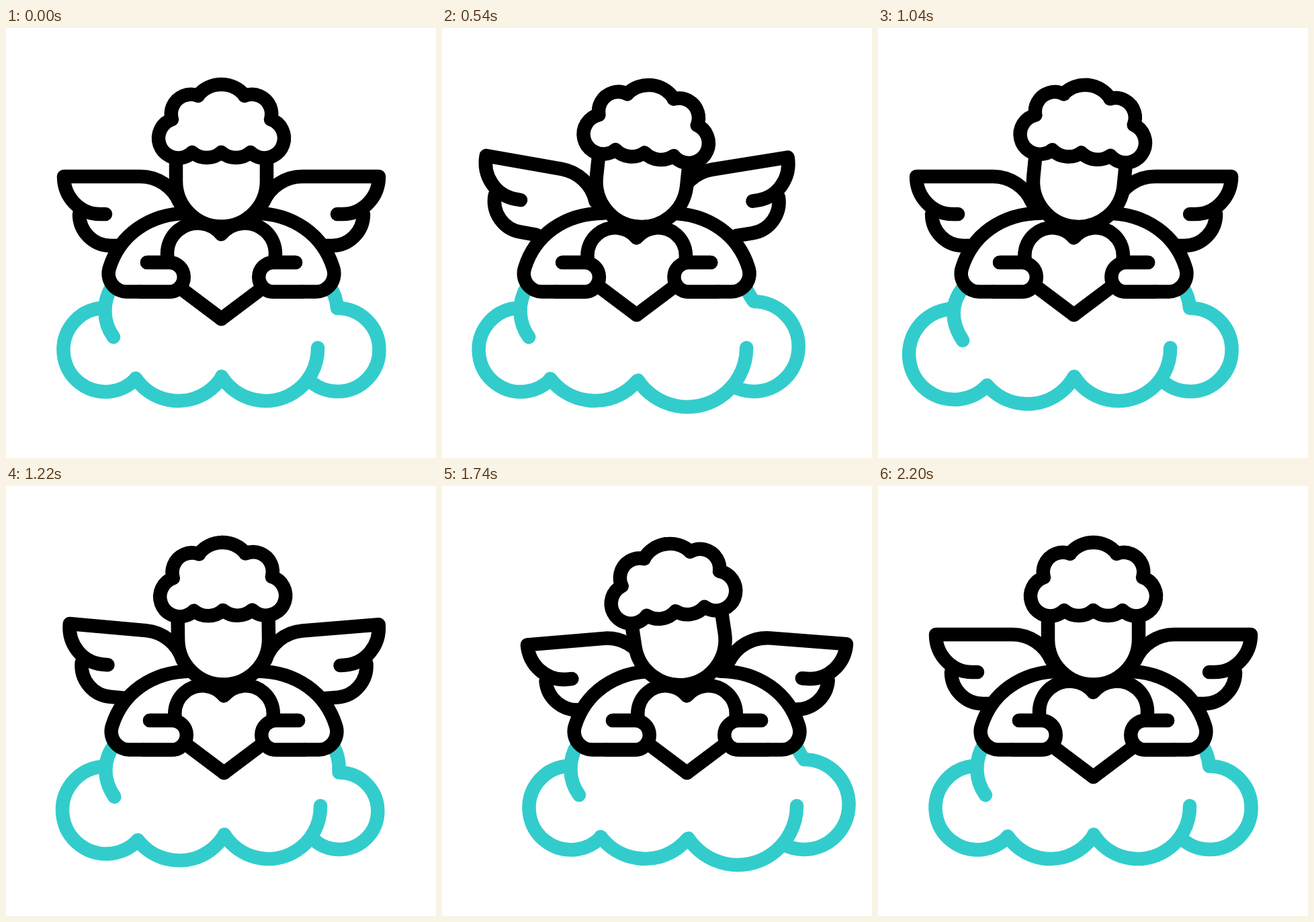
Recreate the animation shown at these times as an HTML page with a canvas. Size 640 by 640 pixels, loop 2400 ms.

```html
<!DOCTYPE html>
<html lang="en">
<head>
<meta charset="utf-8">
<title>Cupid on a cloud</title>
<style>
html, body { margin: 0; width: 100%; height: 100%; overflow: hidden; background: #fff; }
canvas { display: block; width: 100vw; height: 100vh; }
</style>
</head>
<body>
<canvas></canvas>
<script>
const LOOP = 2400, LEAD = 200, SIZE = 640, MID = 320.5;
const SWAY_KEYS = [0, 600, 1400, 2000];
const POSE_KEYS = [0, 333, 833, 1220, 1540, 2000];
const { PI } = Math;

const canvas = document.querySelector('canvas');
const ctx = canvas.getContext('2d');
canvas.width = canvas.height = SIZE * devicePixelRatio;

const arm = new Path2D('M210 349H243A21.75 21.75 0 0 1 243 392.5H180A27 27 0 0 1 154 357C169 309 212 276 272 275.5');
const hand = new Path2D('M210 349H243A21.75 21.75 0 0 1 243 392.5H200');

// Weight of key i: eases up from the key before and down to the key after.
function weight(keys, i, t) {
  const span = t < keys[i] ? keys[i] - keys[i - 1] : keys[i + 1] - keys[i];
  const u = Math.max(0, 1 - Math.abs(t - keys[i]) / span);
  return u * u * (3 - 2 * u);
}

let pen;
function start(x, y) {
  ctx.beginPath();
  ctx.moveTo(x, y);
  pen = [x, y];
}

// Arc around (x, y) from the pen to the direction of (toX, toY).
function puff(x, y, r, toX, toY, ccw = true) {
  ctx.arc(x, y, r, Math.atan2(pen[1] - y, pen[0] - x), Math.atan2(toY - y, toX - x), ccw);
  pen = [toX, toY];
}

function shape(path) {
  ctx.fill(path);
  ctx.stroke(path);
}

function both(draw) {
  for (const side of [1, -1]) {
    ctx.save();
    ctx.translate(MID, 0);
    ctx.scale(side, 1);
    ctx.translate(-MID, 0);
    draw(side);
    ctx.restore();
  }
}

function turn(x, y, degrees) {
  ctx.translate(x, y);
  ctx.rotate(degrees * PI / 180);
  ctx.translate(-x, -y);
}

function cloud(swell, droop, pinch) {
  ctx.strokeStyle = '#3cc';

  start(140 - 6 * droop, 417 + droop);
  puff(148 - 5.5 * droop, 479 + 6.5 * droop, 62.5 + 5 * droop, 192 - droop, 522 + 10 * droop);
  puff(256.5 + 1.5 * swell - 5 * droop, 478 - 6 * swell + 2 * droop, 77 + 5.8 * swell + 2.5 * droop,
    MID + 1.5 * swell, 519 + 6 * swell);
  puff(386.5 + 9.5 * swell, 477.5 - 1.5 * swell, 77.5 + 10.5 * swell, 464 + 19.5 * swell, 476);
  ctx.stroke();

  start(158, 384);
  ctx.bezierCurveTo(143 - 7 * droop, 408, 144 - 7 * droop, 438, 160 - 5 * droop, 460 + 5 * droop);
  ctx.stroke();

  const top = [493 + 2 * swell - 3 * pinch, 417 - 10 * swell + 20 * pinch];
  start(482, 385);
  ctx.bezierCurveTo(489 - 3 * swell + pinch, 395 - 2 * swell + 5 * pinch,
    492 - 2 * swell + pinch, 405 - 4 * swell + 13 * pinch, ...top);
  pen = top;
  puff(493.5 + swell - 3 * pinch, 479 - 5 * swell + 10 * pinch, 62 + 5 * swell - 10 * pinch,
    455 + 9 * swell, 528 + 6 * swell, false);
  ctx.stroke();
}

function wing(angle) {
  turn(268, 266, angle);
  start(109, 277);
  ctx.arc(156, 277, 47, PI, PI / 2, true);
  ctx.lineTo(180, 324);
  ctx.stroke();

  start(148, 277);
  ctx.ellipse(140, 221, 54, 56, 0, PI / 2, PI);
  ctx.lineTo(200, 221);
  ctx.arc(200, 284, 63, -PI / 2, -PI / 8);
  ctx.stroke();
}

function halfHeart(scale) {
  ctx.save();
  ctx.translate(MID, 366);
  ctx.scale(scale, scale);
  ctx.translate(-MID, -366);
  start(MID, 307);
  puff(285.5, 336, 45.5, 240, 336);
  ctx.bezierCurveTo(240, 360, 250, 380, 262, 389);
  ctx.lineTo(MID, 433);
  ctx.restore();
  shapeCurrent();
}

function shapeCurrent() {
  ctx.fill();
  ctx.stroke();
}

function halfFace() {
  start(253, 190);
  ctx.arc(MID, 228, 67.5, PI, PI / 2, true);
  ctx.lineTo(MID, 190);
  ctx.fill();
  start(253, 190);
  ctx.arc(MID, 228, 67.5, PI, PI / 2, true);
  ctx.stroke();
}

function halfHair() {
  start(MID, 84);
  puff(MID, 129, 45, 286, 101);
  puff(275, 128, 29.2, 247, 136);
  puff(256.5, 164, 29.5, 277, 185);
  puff(298.75, 159.4, 33.6, MID, 185);
  shapeCurrent();
}

function draw(t) {
  const pose = i => weight(POSE_KEYS, i, t);
  const sway = weight(SWAY_KEYS, 2, t) - weight(SWAY_KEYS, 1, t);
  const flap = 10 * pose(1) + 10.7 * pose(3) - 4.8 * pose(4);
  const squeeze = pose(1) + pose(2) + pose(3) + pose(4);
  const scale = canvas.width / SIZE;

  ctx.setTransform(scale, 0, 0, scale, 0, 0);
  ctx.fillStyle = '#fff';
  ctx.fillRect(0, 0, SIZE, SIZE);
  ctx.lineWidth = 20.5;
  ctx.lineCap = ctx.lineJoin = 'round';
  ctx.translate(51.2 * sway, 0);

  cloud(pose(1) + pose(4), pose(2), pose(3));
  ctx.strokeStyle = '#000';
  both(side => wing(side > 0 ? flap : flap * 0.92));
  both(() => shape(arm));
  both(() => halfHeart(1 - 0.09 * squeeze));
  both(() => shape(hand));
  turn(MID, 298, -10 * sway);
  both(halfFace);
  both(halfHair);
}

function tick() {
  draw(performance.now() % LOOP - LEAD);
  requestAnimationFrame(tick);
}
tick();
</script>
</body>
</html>
```
